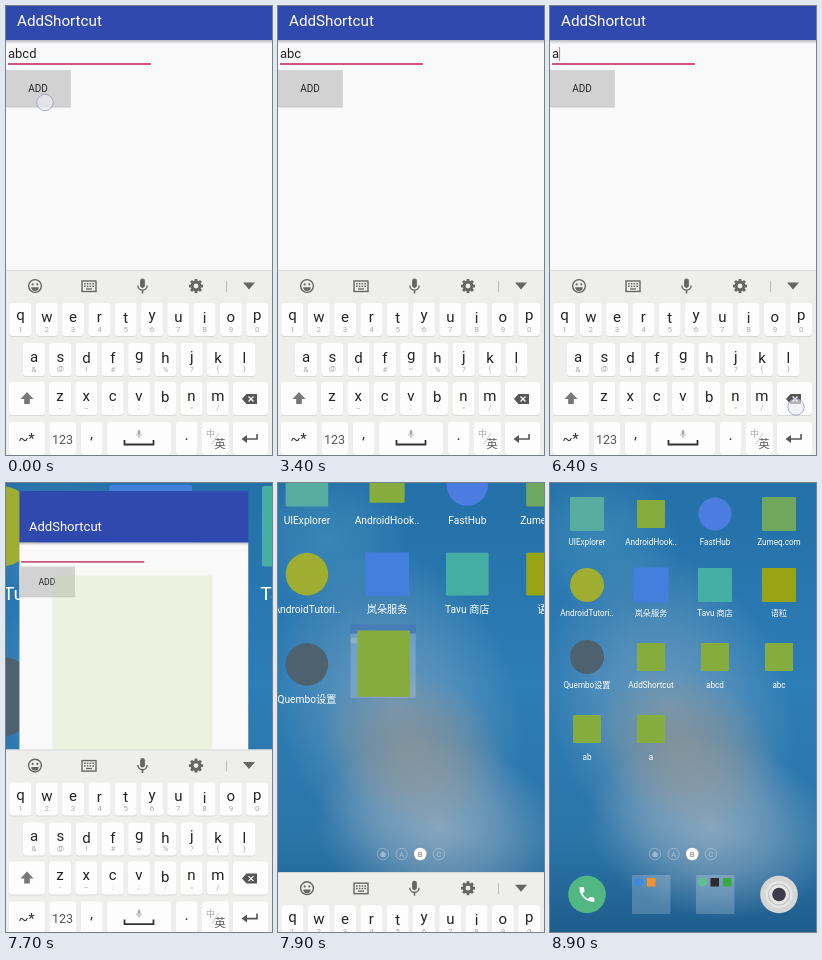
An HTML page with a canvas that plays this animation: 266 px wide and 449 px high, repeating every 9000 ms.

```html
<!DOCTYPE html>
<html lang="en">
<head>
<meta charset="utf-8">
<title>AddShortcut</title>
<style>
  html, body { margin: 0; width: 100%; height: 100%; overflow: hidden; background: #fafafa; }
  canvas { display: block; width: 266px; height: 449px; }
</style>
</head>
<body>
<canvas id="stage"></canvas>
<script>
const W = 266, H = 449, LOOP = 9000, STEP = 100;
const FONT = "Roboto, 'Noto Sans CJK SC', 'Noto Sans CJK', sans-serif";
const GREEN = '#86ac3e';
const canvas = document.getElementById('stage');
const ctx = canvas.getContext('2d');
const dpr = window.devicePixelRatio || 1;
canvas.width = W * dpr;
canvas.height = H * dpr;

const clamp = v => Math.max(0, Math.min(1, v));
const smooth = v => v * v * (3 - 2 * v);
const lerp = (a, b, k) => a + (b - a) * k;

// Value of the last [time, value] entry already reached.
function valueAt(track, t) {
  let value = track[0][1];
  for (const [time, v] of track) if (t >= time) value = v;
  return value;
}

function rect(x, y, w, h, color, r = 0) {
  ctx.fillStyle = color;
  ctx.beginPath();
  ctx.roundRect(x, y, w, h, r);
  ctx.fill();
}

function disc(x, y, r, color) {
  ctx.fillStyle = color;
  ctx.beginPath();
  ctx.arc(x, y, r, 0, 7);
  ctx.fill();
}

function ring(x, y, r, color, width = 1) {
  ctx.strokeStyle = color;
  ctx.lineWidth = width;
  ctx.beginPath();
  ctx.arc(x, y, r, 0, 7);
  ctx.stroke();
}

function poly(points, color) {
  ctx.fillStyle = color;
  ctx.beginPath();
  points.forEach(([x, y]) => ctx.lineTo(x, y));
  ctx.fill();
}

function line(points, color, width) {
  ctx.strokeStyle = color;
  ctx.lineWidth = width;
  ctx.beginPath();
  points.forEach(([x, y]) => ctx.lineTo(x, y));
  ctx.stroke();
}

function text(str, x, y, size, color, align = 'center') {
  ctx.font = `${size}px ${FONT}`;
  ctx.textAlign = align;
  ctx.fillStyle = color;
  ctx.fillText(str, x, y);
}

// Centres the ink of a glyph, not its line box.
function glyph(str, x, y, size, color) {
  ctx.font = `${size}px ${FONT}`;
  const m = ctx.measureText(str);
  text(str, x, y + (m.actualBoundingBoxAscent - m.actualBoundingBoxDescent) / 2, size, color);
}

function layer(paint) {
  ctx.save();
  paint();
  ctx.restore();
}

// ---- App ----

const typed = [[0, 'abcd'], [2500, 'abc'], [3800, 'ab'], [5200, 'a'], [6600, '']];
const cursor = [[0, 0], [1700, 1], [2000, 0], [2500, 1], [3400, 0], [3800, 1], [4000, 0],
  [5200, 1], [5800, 0], [6200, 1], [7500, 0]];
// [start, end, x, y]
const touches = [
  [0, 1800, 39, 96.5], [2200, 2700, 246.5, 403], [2900, 3200, 40, 92],
  [3600, 4000, 242, 401.5], [4300, 4600, 40, 92], [4800, 5500, 243, 402.5],
  [5800, 6000, 40, 92], [6400, 6900, 246, 401]
];
const presses = [[2900, 3100], [4300, 4500], [5800, 5900]];

function drawApp(t) {
  const page = ctx.createLinearGradient(0, 34, 0, 38);
  page.addColorStop(0, '#b9bbc2');
  page.addColorStop(1, '#f9f9f9');
  rect(0, 34, W, 446, page);
  rect(0, -29, W, 63, '#3049af');
  text('AddShortcut', 11, 19.5, 15.2, '#fff', 'left');

  const value = valueAt(typed, t);
  text(value, 2, 52, 13, '#222', 'left');
  if (valueAt(cursor, t)) rect(2 + ctx.measureText(value).width, 41, 1, 14, '#c87898');
  rect(2, 57, 143, 2, '#cb5680');

  const pressed = presses.some(([a, b]) => t >= a && t < b);
  rect(0, 64, 64.5, 37.5, '#c6c6c6');
  rect(0, 64, 64.5, 36.5, pressed ? '#c3c3c3' : '#d2d2d2');
  text('ADD', 32, 86, 10, '#222');
}

function drawTouch(t) {
  for (const [start, end, x, y] of touches) {
    if (t < start || t >= end) continue;
    layer(() => {
      ctx.globalAlpha = t >= end - STEP ? 0.5 : 1;
      disc(x, y, 8.5, 'rgba(236,236,246,.62)');
      ring(x, y, 8.2, 'rgba(120,125,195,.6)');
    });
  }
}

// ---- Keyboard ----

const ICON = '#666';

function drawMic(x, y, s, color) {
  layer(() => {
    ctx.translate(x, y);
    ctx.scale(s, s);
    rect(-2.4, -7.5, 4.8, 9.5, color, 2.4);
    ctx.strokeStyle = color;
    ctx.lineWidth = 1.4;
    ctx.beginPath();
    ctx.arc(0, -0.5, 4.6, 0, Math.PI);
    ctx.stroke();
    line([[0, 4], [0, 7.5]], color, 1.6);
  });
}

function drawToolbar() {
  ring(29, 280, 6.4, ICON, 1.4);
  disc(26.7, 278.3, 1.1, ICON);
  disc(31.3, 278.3, 1.1, ICON);
  ctx.fillStyle = ICON;
  ctx.beginPath();
  ctx.arc(29, 281.3, 3.7, 0, Math.PI);
  ctx.fill();

  ctx.strokeStyle = ICON;
  ctx.lineWidth = 1.4;
  ctx.strokeRect(76, 275, 14, 10.5);
  for (let i = 0; i < 4; i++) {
    rect(78 + i * 2.8, 277, 1.6, 1.5, ICON);
    rect(78 + i * 2.8, 279.6, 1.6, 1.5, ICON);
  }
  rect(80, 282.3, 6, 1.3, ICON);

  drawMic(136.5, 280, 1, ICON);

  for (let i = 0; i < 8; i++) {
    const a = i * Math.PI / 4, c = Math.cos(a), s = Math.sin(a);
    line([[190 + 4 * c, 280 + 4 * s], [190 + 7 * c, 280 + 7 * s]], ICON, 2.8);
  }
  ring(190, 280, 3.9, ICON, 3);

  rect(220, 275, 1, 11, '#bbb');
  poly([[237, 276.5], [249, 276.5], [243, 283.5]], ICON);
}

function key(x, y, w, color = '#fdfdfd') {
  rect(x, y + 1, w, 33, '#d9d9d8', 3);
  rect(x, y, w, 33, color, 3);
}

function keyRow(letters, subs, firstX, y) {
  [...letters].forEach((letter, i) => {
    const x = firstX + i * 26.3;
    key(x - 11, y, 22);
    glyph(letter, x, y + 14.5, 15, '#222');
    glyph(subs[i], x, y + 26.2, 8, '#aaa');
  });
}

function drawKeyboard(t) {
  rect(0, 264, W, 200, '#eeeeec');
  rect(0, 264, W, 1, '#dbdbda');
  drawToolbar();
  keyRow('qwertyuiop', '1234567890', 14.5, 297);
  keyRow('asdfghjkl', '&@!#~%?()', 28, 337);
  keyRow('zxcvbnm', "-_:;'\"/", 54, 376);

  key(3, 376, 36);
  poly([[21, 386], [27.5, 393], [23.8, 393], [23.8, 398], [18.2, 398], [18.2, 393], [14.5, 393]], '#777');
  key(227, 376, 35, t >= 5200 && t < 5400 ? '#e2e2e4' : '#fdfdfd');
  poly([[236, 393], [240.5, 388], [251, 388], [251, 398], [240.5, 398]], '#555');
  line([[242.5, 390.5], [247.5, 395.5]], '#fff', 1.3);
  line([[247.5, 390.5], [242.5, 395.5]], '#fff', 1.3);

  const bottomKeys = [[3, 36], [43.5, 26.5], [75, 21.5], [101, 64], [170, 21.5], [196, 27], [227, 35]];
  bottomKeys.forEach(([x, w]) => key(x, 416, w));
  text('~*', 20.5, 438, 15, '#333');
  glyph('123', 56.5, 433, 12.5, '#555');
  glyph(',', 85.5, 433, 15, '#333');
  glyph('.', 180.5, 433, 16, '#333');
  drawMic(133, 428, 0.55, '#aaa');
  line([[118.5, 434], [118.5, 438.5], [147.5, 438.5], [147.5, 434]], '#333', 1.8);
  text('中', 204.5, 431, 9, '#aaa');
  text('英', 214, 441.5, 11, '#555');
  line([[206, 438], [213, 427]], '#bbb', 0.8);
  line([[251, 428], [251, 433], [238, 433]], '#555', 1.6);
  poly([[235.5, 433], [241, 429], [241, 437]], '#555');
}

// ---- Home screen ----

const columnX = i => 37 + 64 * (i % 4);
const rowY = i => [31, 102, 174, 246][Math.floor(i / 4)];
// [label, color, size, round]
const apps = [
  ['UIExplorer', '#58ada0', 34, 0], ['AndroidHook..', GREEN, 28, 0],
  ['FastHub', '#4a7ddf', 33, 1], ['Zumeq.com', '#70a860', 34, 0],
  ['AndroidTutori..', '#9fae30', 34, 1], ['岚朵服务', '#437fdc', 35, 0],
  ['Tavu 商店', '#45afa6', 34, 0], ['语粒', '#98a414', 34, 0],
  ['Quembo设置', '#4d616e', 34, 1], ['AddShortcut', GREEN, 28, 0],
  ...['abcd', 'abc', 'ab', 'a'].map(name => [name, GREEN, 28, 0])
];
const OWN = 9, FIRST_NEW = 10;
const handset = new Path2D('M6.6 10.8c1.4 2.8 3.8 5.1 6.6 6.6l2.2-2.2c.3-.3.7-.4 1-.2 1.1.4 2.3.6 3.6.6.6 0 1 .4 1 1V20c0 .6-.4 1-1 1C10.6 21 3 13.4 3 4c0-.6.4-1 1-1h3.5c.6 0 1 .4 1 1 0 1.3.2 2.5.6 3.6.1.3 0 .7-.2 1z');

function glow(x, y, rx, ry, turn, rgb, alpha) {
  layer(() => {
    ctx.translate(x, y);
    ctx.rotate(turn);
    ctx.scale(rx, ry);
    const g = ctx.createRadialGradient(0, 0, 0, 0, 0, 1);
    g.addColorStop(0, `rgba(${rgb},${alpha})`);
    g.addColorStop(0.5, `rgba(${rgb},${alpha * 0.6})`);
    g.addColorStop(1, `rgba(${rgb},0)`);
    disc(0, 0, 1, g);
  });
}

function drawWallpaper() {
  const g = ctx.createLinearGradient(0, 0, 0, H);
  g.addColorStop(0, '#2470a8');
  g.addColorStop(0.45, '#2d7db6');
  g.addColorStop(0.8, '#2a74a8');
  g.addColorStop(1, '#1f5d8d');
  rect(0, 0, W, H, g);
  glow(50, 55, 80, 70, 0, '80,155,195', 0.45);
  glow(120, 225, 120, 165, -0.35, '150,175,195', 0.55);
  glow(160, 345, 125, 90, 0.2, '160,178,195', 0.75);
  glow(135, 265, 95, 75, 0.4, '160,145,130', 0.55);
}

function drawAppIcon(i, scale = 1) {
  const [label, color, size, round] = apps[i];
  layer(() => {
    ctx.translate(columnX(i), rowY(i));
    ctx.scale(scale, scale);
    if (round) disc(0, 0, size / 2, color);
    else rect(-size / 2, -size / 2, size, size, color, 1);
    text(label, 0, 31, 8.15, '#fff');
  });
}

function drawDock() {
  ['', 'A', 'B', 'C'].forEach((letter, i) => {
    const x = 105 + i * 18.6, active = letter === 'B';
    if (active) disc(x, 371, 6.3, '#fff');
    else ring(x, 371, 5.7, 'rgba(255,255,255,.35)', 0.9);
    if (letter) text(letter, x, 374, 8, active ? '#777' : 'rgba(255,255,255,.45)');
    else poly([[x - 3, 371], [x, 368], [x + 3, 371], [x + 2, 374], [x - 2, 374]], 'rgba(255,255,255,.4)');
  });

  disc(37, 411.5, 18.8, '#53b784');
  layer(() => {
    ctx.translate(27, 401.5);
    ctx.scale(0.83, 0.83);
    ctx.fillStyle = '#fff';
    ctx.fill(handset);
  });

  [82, 146].forEach(x => rect(x, 392, 38.5, 39, 'rgba(255,255,255,.2)', 1));
  disc(88.5, 399, 4.6, '#3d8be0');
  rect(97, 395, 8.5, 8.5, '#f0922f');
  disc(152.5, 399, 4.6, '#5fbf92');
  rect(160.5, 395, 8.5, 8.5, '#2b2b2e');
  rect(173, 395, 8.5, 8.5, '#3aa83c');

  disc(229, 411.5, 18.8, '#d6d6d6');
  disc(229, 411.5, 13.5, '#e6e6e6');
  ring(229, 411.5, 10.5, '#c4c4c6', 1.2);
  disc(229, 411.5, 6.8, '#3d3b47');
}

function overshoot(k) {
  const u = k - 1;
  return u * u * (2.3 * u + 1.3) + 1;
}

function drawHome(t, p) {
  drawWallpaper();
  layer(() => {
    const zoom = 1 + 1.62 * (1 - p);
    ctx.translate(69, 145);
    ctx.scale(zoom, zoom);
    ctx.translate(-69, -145);
    for (let i = 0; i < FIRST_NEW; i++) if (i !== OWN || p === 1) drawAppIcon(i);
  });
  drawDock();
  for (let i = FIRST_NEW; i < apps.length; i++) {
    const k = clamp((t - 8200 - (i - FIRST_NEW) * 85) / 450);
    if (k > 0) layer(() => {
      ctx.globalAlpha = k;
      drawAppIcon(i, overshoot(k));
    });
  }
}

// The closing window shrinks onto its launcher icon.
function drawClosing(t, p) {
  const rest = 1 - p, py = 1 - rest ** 1.3;
  layer(() => {
    ctx.globalAlpha = Math.min(1, 1.2 * rest);
    ctx.translate(86 * p, 160 * py);
    ctx.scale(lerp(1, 0.105, p), lerp(1, 0.06, py));
    drawApp(t);
  });
  layer(() => {
    ctx.globalAlpha = clamp(1.5 * p);
    rect(87 - 48 * rest, 160 - 80 * rest, 28 + 156 * rest, 28 + 244 * rest, p < 0.8 ? '#bdd58e' : GREEN);
  });
  layer(() => {
    ctx.translate(0, 185 * p ** 2.3);
    drawKeyboard(t);
  });
}

function render(now) {
  const t = Math.floor(now % LOOP / STEP) * STEP;
  ctx.setTransform(dpr, 0, 0, dpr, 0, 0);
  const p = smooth(clamp((t - 7600) / 400));
  if (p > 0) {
    drawHome(t, p);
    if (p < 1) drawClosing(t, p);
  } else {
    drawApp(t);
    drawKeyboard(t);
    drawTouch(t);
  }
}

const begin = performance.now();
function tick() {
  render(performance.now() - begin);
  requestAnimationFrame(tick);
}
tick();
</script>
</body>
</html>
```
